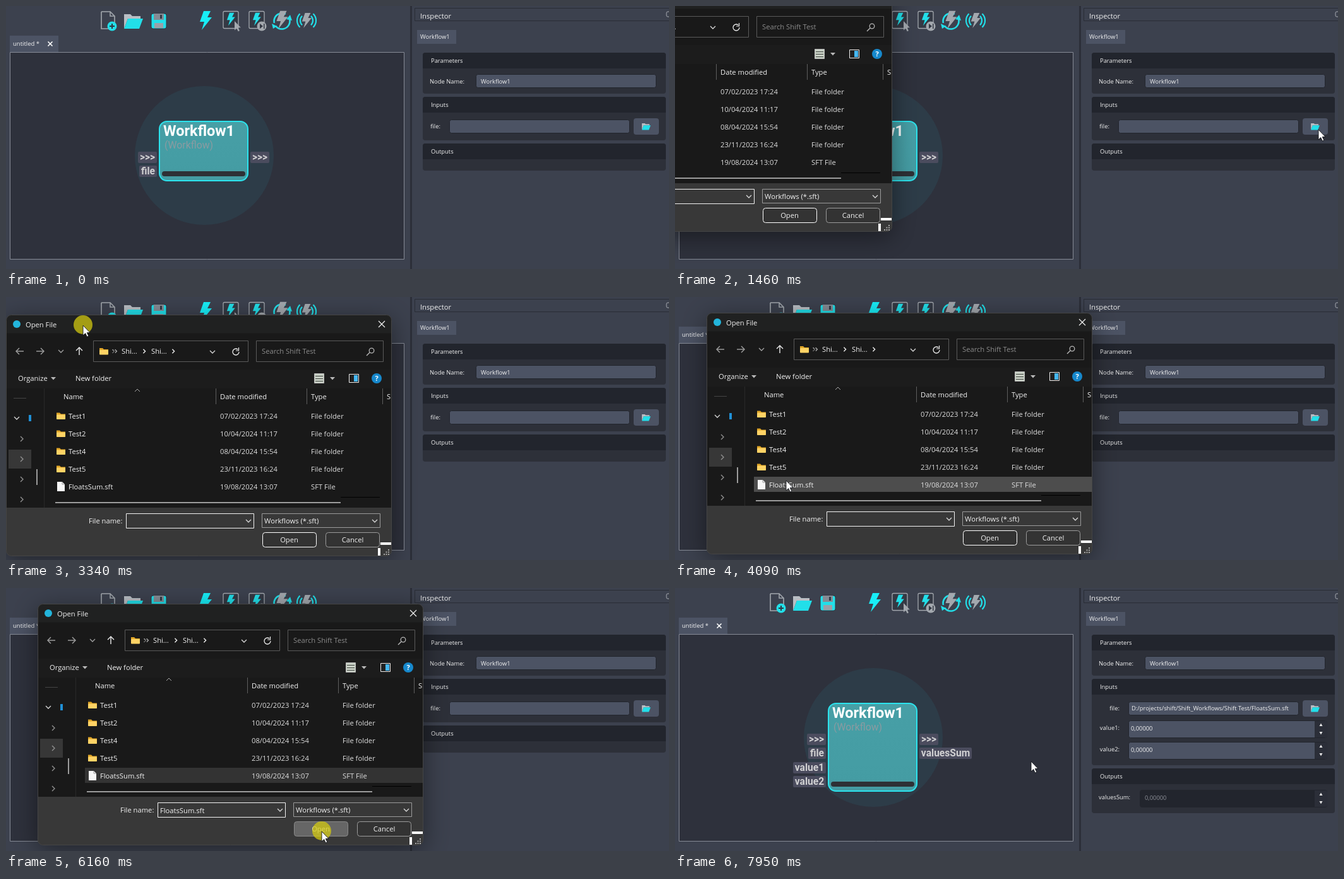
Recreate the animation shown at these times as an HTML page with a canvas. Size 1050 by 417 pixels, loop 8000 ms.

```html
<!DOCTYPE html>
<html lang="en">
<head>
<meta charset="utf-8">
<title>Workflow file picker</title>
<style>
html, body { margin: 0; width: 100%; height: 100%; overflow: hidden; background: #3c414e; }
canvas { display: block; }
</style>
</head>
<body>
<canvas id="stage" width="1050" height="417"></canvas>
<script>
const ctx = document.getElementById('stage').getContext('2d');
const LOOP = 8000, STEP = 65.8;
const CYAN = '#22dfe9', GRAY = '#a3a8ae', FIELD = '#4c5364';
const UI = '"Open Sans", "Noto Sans", sans-serif', NODE = 'Roboto, sans-serif';

// Screen updates arrive in bursts, each with its own clock.
const BURSTS = [0, 450, 1260, 2070, 2270, 3070, 3890, 4500, 5360, 6030, 6490, 7160];
const DIALOG_PATH = [[3000, -267, -53], [3070, -263, -52], [3136, -225, -42], [3202, -125, -16],
  [3268, -50, -3], [3333, 0, 0], [3400, 28, 1], [3540, 50, -3]];
const POINTER_PATH = [[450, 1046, 379], [650, 1040, 310], [900, 1024, 215], [1120, 1019, 196],
  [1590, 1019, 196], [1720, 760, 215], [1850, 300, 232], [1980, 56, 225], [2130, 15, 226],
  [2270, 8, 205], [2400, -14, 97], [2600, -145, -8], [3000, -145, -8]];
const POINTER_PATH_AFTER_DRAG = [[3600, 173, 42], [3800, 171, 64], [3950, 172, 150], [4087, 176, 291],
  [4160, 165, 342], [4340, 131, 299], [4700, 131, 299], [5000, 260, 370], [5290, 450, 418],
  [5360, 520, 414], [5500, 553, 399], [5880, 500, 386], [7160, 500, 386], [7360, 512, 365],
  [7700, 550, 295], [7949, 564, 275]];

function along(path, t) {
  const i = path.findIndex(k => k[0] > t);
  if (i === 0) return path[0].slice(1);
  if (i < 0) return path[path.length - 1].slice(1);
  const [a, b] = [path[i - 1], path[i]], p = (t - a[0]) / (b[0] - a[0]);
  return [1, 2].map(n => Math.round(a[n] + (b[n] - a[n]) * p));
}

function box(x, y, w, h, fill, stroke, r = 0, line = 1) {
  ctx.beginPath();
  ctx.roundRect(x, y, w, h, r);
  if (fill) { ctx.fillStyle = fill; ctx.fill(); }
  if (stroke) { ctx.strokeStyle = stroke; ctx.lineWidth = line; ctx.stroke(); }
}
function disc(x, y, r, fill) {
  ctx.beginPath();
  ctx.arc(x, y, r, 0, 7);
  ctx.fillStyle = fill;
  ctx.fill();
}
function arc(x, y, r, from, to, color, width) {
  ctx.beginPath();
  ctx.arc(x, y, r, from, to);
  ctx.strokeStyle = color;
  ctx.lineWidth = width;
  ctx.stroke();
}
// Points are relative to x, y. Fills a shape, or strokes an open line when width is given.
function poly(x, y, points, color, width, scale = 1) {
  ctx.beginPath();
  for (let i = 0; i < points.length; i += 2) ctx.lineTo(x + points[i] * scale, y + points[i + 1] * scale);
  if (width) { ctx.strokeStyle = color; ctx.lineWidth = width; ctx.stroke(); }
  else { ctx.closePath(); ctx.fillStyle = color; ctx.fill(); }
}
// y is the vertical middle of the capitals.
function text(s, x, y, size, color = '#f2f2f2', family = UI, weight = 400, align = 'left') {
  ctx.font = `${weight} ${size}px ${family}`;
  ctx.textAlign = align;
  ctx.fillStyle = color;
  ctx.fillText(s, x, y + size * 0.36);
}

const bolt = (x, y, scale, color) =>
  poly(x, y, [-3, -15, 8, -15, 3, -5, 10, -5, -6, 15, -2, 2, -9, 2], color, 0, scale);
const pointerShape = (x, y, color, scale = 1) =>
  poly(x, y, [0, 0, 0, 16, 3.7, 12.5, 6.3, 18, 8.8, 17, 6.3, 11.5, 11, 11.5], color, 0, scale);

function openFolder(x, y, scale) {
  poly(x, y, [-15, 12, -15, -11, -5, -11, -2, -8, 11, -8, 11, -4, -9, -4], '#b9bec4', 0, scale);
  poly(x, y, [-9, -4, 15, -4, 9, 12, -15, 12], CYAN, 0, scale);
}

function toolbar() {
  poly(151, 9, [0, 0, 14, 0, 21, 7, 21, 27, 0, 27, 0, 0], GRAY, 1.6);
  poly(165, 9, [0, 0, 0, 7, 7, 7], GRAY, 1.5);
  disc(168, 32, 7.5, CYAN);
  poly(168, 32, [-4, 0, 4, 0], '#303641', 2);
  poly(168, 32, [0, -4, 0, 4], '#303641', 2);
  openFolder(202, 24, 1);
  box(230, 12, 24, 24, CYAN, '#30343f', 3);
  box(234, 12, 16, 10, '#848b94');
  box(244, 14, 3, 6, '#333945');
  box(235, 27, 14, 8, '#9aa1a9');
  bolt(316, 23, 1, '#18eef7');
  for (const x of [344, 385]) {
    box(x, 8.5, 24, 27, '#343944', GRAY, 2, 1.3);
    bolt(x + 12, 21, 0.68, CYAN);
  }
  pointerShape(362, 24, GRAY, 0.9);
  disc(405, 32, 7.5, GRAY);
  poly(405, 32, [-3, -4, 2, 0, -3, 4], '#343944');
  box(408, 28, 1.5, 8, '#343944');
  arc(437, 24, 12.5, -0.2, 2.5, CYAN, 2.6);
  arc(437, 24, 12.5, 2.9, 5.2, CYAN, 2.6);
  poly(449, 19, [-5, 2, 1, -5, 4, 4], CYAN);
  poly(425, 31, [-4, -3, 4, 1, -2, 5], CYAN);
  bolt(437, 22, 0.95, GRAY);
  bolt(476, 23, 0.8, GRAY);
  for (const r of [10, 15]) {
    arc(476, 23, r, -0.8, 0.8, CYAN, 2.2);
    arc(476, 23, r, Math.PI - 0.8, Math.PI + 0.8, CYAN, 2.2);
  }
}

function port(label, x, y, w) {
  box(x, y, w, 18, '#4b4c5e', null, 2);
  text(label, x + w / 2, y + 8.5, 15.6, '#d0d0d2', NODE, 700, 'center');
}

function workspace(expanded) {
  box(6, 47, 77, 26, FIELD);
  text('untitled *', 11, 60, 9.5);
  poly(70, 60, [-3.5, -3.5, 3.5, 3.5], '#fff', 1.6);
  poly(70, 60, [3.5, -3.5, -3.5, 3.5], '#fff', 1.6);
  box(6.5, 73.5, 624, 328, '#2e313c', '#868b96');
  disc(314, 237, 110, '#2d3c48');

  const bottom = expanded ? 322 : 277;
  const fill = ctx.createLinearGradient(0, 183, 0, bottom);
  fill.addColorStop(0, '#479fa6');
  fill.addColorStop(1, '#449ca3');
  box(243, 183, 140, bottom - 183, fill, '#2be4ee', 12, 2);
  text('Workflow1', 249, 198, 23.5, '#fff', NODE, 700);
  text('(Workflow)', 251, 220, 15.8, '#8b9ba1', NODE);
  box(247, bottom - 15, 132, 8, '#2e3035', null, 4);
  port('>>>', 209, 231, 30);
  port('file', 211, 253, 28);
  port('>>>', 387, 231, 30);
  if (expanded) {
    port('value1', 187, 276, 52);
    port('value2', 187, 298, 52);
    port('valuesSum', 387, 253, 83);
  }
}

function panel(title, y, h) {
  box(660, y, 385, h, '#2d3039', null, 4);
  box(660, y, 385, 25, '#22252d', null, [4, 4, 0, 0]);
  text(title, 673, y + 12.5, 9.4);
}
const field = (x, y, w, h = 21, fill = FIELD) => box(x + 0.5, y + 0.5, w - 1, h, fill, '#22252d', 3);

function spinner(label, labelRight, x, y, disabled) {
  text(label, labelRight, y + 12, 9.4, '#f2f2f2', UI, 400, 'right');
  field(x, y, 1033 - x, 27, disabled ? '#22252d' : FIELD);
  box(1013, y + 1, 20, 26, '#2b2e38', null, [0, 3, 3, 0]);
  text('0,00000', x + (disabled ? 8 : 4), y + 13, 9.4, disabled ? '#8c8f97' : '#f2f2f2');
  poly(1023, y + 7, [-2.5, 2, 2.5, 2, 0, -2.5], '#e8e8e8');
  poly(1023, y + 20, [-2.5, -2, 2.5, -2, 0, 2.5], '#e8e8e8');
}

function inspector(loaded) {
  box(640, 0, 3, 417, '#2c2f39');
  box(647.5, 3.5, 420, 20, '#3c414e', '#292c35');
  text('Inspector', 656, 16, 11.2);
  box(1046, 9, 10, 8, null, '#a5a8ae', 2);
  box(651, 38, 62, 22, FIELD);
  text('Workflow1', 656, 49, 9.4);

  panel('Parameters', 74, 65);
  text('Node Name:', 671, 119.5, 9.4);
  field(744, 108, 286);
  text('Workflow1', 752, 119.5, 9.4);

  panel('Inputs', 144, loaded ? 137 : 69);
  text('file:', loaded ? 704 : 688, 190.5, 9.4, '#f2f2f2', UI, 400, 'right');
  const x = loaded ? 718 : 702;
  field(x, 180, 988 - x);
  box(994, 178, 40, 26, FIELD, null, 4);
  openFolder(1014, 191, 0.46);
  if (loaded) {
    text('D:/projects/shift/Shift_Workflows/Shift Test/FloatsSum.sft', 723, 191, 9.4);
    spinner('value1:', 704, 718, 210);
    spinner('value2:', 704, 718, 244);
  }
  panel('Outputs', loaded ? 286 : 218, loaded ? 71 : 43);
  if (loaded) spinner('valuesSum:', 721, 736, 320, true);
}

const chevronDown = (x, y, color = '#d8d8d8') => poly(x, y, [-4, -2, 0, 2, 4, -2], color, 1.3);
const chevronRight = (x, y, color = '#8f8f8f', s = 1) => poly(x, y, [-2, -4, 2, 0, -2, 4], color, 1.4, s);
const triangle = (x, y) => poly(x, y, [-4, -2, 4, -2, 0, 2.5], '#b9b9b9');
function arrow(x, y, angle, color) {
  ctx.save();
  ctx.translate(x, y);
  ctx.rotate(angle);
  poly(0, 0, [-6, 0, 6, 0], color, 1.4);
  poly(0, 0, [1, -5, 6, 0, 1, 5], color, 1.4);
  ctx.restore();
}
function folder(x, y) {
  poly(x, y, [-7, -5, -2, -5, 0, -3, 7, -3, 7, 5, -7, 5], '#e0a526');
  box(x - 7, y - 2, 14, 7.5, '#ffd365', null, 1);
}

const ROWS = [
  ['Test1', '07/02/2023 17:24'], ['Test2', '10/04/2024 11:17'], ['Test4', '08/04/2024 15:54'],
  ['Test5', '23/11/2023 16:24'], ['FloatsSum.sft', '19/08/2024 13:07']
];

function dialog(t, dx, dy, px, py) {
  const label = (s, x, y, color) => text(s, x, y, 11.2, color);
  const over = (x, y, w, h) => px >= x && px < x + w && py >= y && py < y + h;
  ctx.save();
  ctx.translate(dx, dy);
  ctx.shadowColor = 'rgba(0,0,0,.45)';
  ctx.shadowBlur = 40;
  ctx.shadowOffsetY = 8;
  box(0.5, 28.5, 610, 382, '#191919', null, 8);
  ctx.shadowColor = 'transparent';
  box(0.5, 28.5, 610, 29, '#202121', null, [8, 8, 0, 0]);
  box(0.5, 115, 610, 30, '#1c1c1c');
  box(0.5, 334, 610, 76.5, '#383838', null, [0, 0, 8, 8]);
  box(0.5, 28.5, 610, 382, null, '#454545', 8);

  disc(17, 43, 6, '#23b5dc');
  label('Open File', 31, 43.5);
  poly(595, 43, [-5, -5, 5, 5], '#eee', 1.2);
  poly(595, 43, [5, -5, -5, 5], '#eee', 1.2);

  arrow(22, 86, Math.PI, '#a2a2a2');
  arrow(54, 86, 0, '#a2a2a2');
  chevronDown(87, 86, '#a2a2a2');
  arrow(116, 86, -Math.PI / 2, '#eee');
  box(138.5, 69.5, 245, 33, null, '#5a5a5a');
  folder(155, 86);
  chevronRight(170, 86, '#aaa', 0.7);
  chevronRight(174, 86, '#aaa', 0.7);
  ctx.clearRect;
  label('«', 168, 86, '#191919');
  label('Shi...', 183, 86);
  chevronRight(219, 86, '#eee', 0.8);
  const listing = t < 1530;
  label('Shi...', listing ? 244 : 230, 86);
  if (!listing) chevronRight(265, 86, '#eee', 0.8);
  chevronDown(327, 87);
  arc(364, 87, 5, 0, 5.4, '#eee', 1.3);
  poly(368, 82, [0.5, -2, 0.5, 3, -4, 3], '#eee', 1.2);
  box(396.5, 69.5, 201, 33, null, '#5a5a5a');
  label('Search Shift Test', 405, 86, '#8b8b8b');
  arc(579, 85, 3.8, 0, 7, '#b5b5b5', 1.3);
  poly(576, 88, [0, 0, -5, 5], '#b5b5b5', 1.5);

  label('Organize', 19, 129);
  triangle(75, 129);
  label('New folder', 110, 129);
  box(488.5, 121.5, 15, 15, '#c7cfc4', '#bbb');
  for (let y = 125; y < 136; y += 4) box(490, y, 12, 1, '#424742');
  triangle(517, 129);
  box(543.5, 122.5, 15, 13, '#202020', '#eee');
  box(551, 124, 6, 10, '#45b8f4');
  disc(587, 129, 8, '#1688cc');
  text('?', 587, 129, 11, '#fff', UI, 700, 'center');

  label('Name', 91, 158);
  label('Date modified', 339, 158);
  label('Type', 483, 158);
  label('S', 603, 158);
  poly(208, 148, [-4, 2, 0, -2, 4, 2], '#aaa', 1);
  for (const x of [332, 476, 596]) box(x, 145, 1, 25, '#5e5e5e');

  box(12, 160, 20, 1, '#444');
  chevronDown(17, 192);
  box(36, 187, 4, 10, '#2090d6');
  box(4, 242, 36, 30, '#373737');
  for (const y of [225, 257, 289, 321]) chevronRight(25, y);
  box(60, 145, 1, 189, '#292929');
  box(48, 273, 2, 25, '#9c9c9c');

  ROWS.forEach(([name, date], i) => {
    const y = 189 + 28 * i, isFile = i === 4;
    const hovered = over(75, y - 13, 535, 24);
    const shade = isFile && t >= 6030 ? '#333' : isFile && t >= 4566 ? '#777' : hovered ? '#4d4d4d' : null;
    if (shade) box(75, y - 13, 535, 24, shade);
    if (isFile) {
      poly(87, y, [-6, -8, 2, -8, 6, -4, 6, 7, -6, 7], '#f5f5f5');
      poly(87, y, [2, -8, 2, -4, 6, -4], '#999', 1);
    } else folder(87, y - 0.5);
    label(name, 99, y);
    label(date, 339, y, '#dedede');
    label(isFile ? 'SFT File' : 'File folder', 483, y, '#dedede');
  });
  box(78, 325, 452, 2, '#9c9c9c');
  box(530, 317, 62, 1, '#000');

  label('File name:', 131, 355);
  box(190.5, 343.5, 202, 23, '#383838', '#f2f2f2');
  if (t >= 4566) label('FloatsSum.sft', 194, 355.5);
  chevronDown(384, 355);
  box(405.5, 343.5, 187, 22, '#383838', '#9b9b9b');
  label('Workflows (*.sft)', 409, 355);
  chevronDown(584, 355);
  const openFill = t >= 6030 ? '#666' : over(406, 373, 86, 23) ? '#454545' : '#333';
  box(406.5, 373.5, 85, 23, openFill, t >= 6030 ? '#8a8a8a' : '#fff', 4);
  box(506.5, 373.5, 85, 23, '#333', '#9b9b9b', 4);
  text('Open', 448.5, 385, 11.2, '#f2f2f2', UI, 400, 'center');
  text('Cancel', 549, 385, 11.2, '#f2f2f2', UI, 400, 'center');

  box(593, 389, 17, 4, '#fff');
  box(589, 398, 4, 12, '#fff');
  for (let i = 0; i < 3; i++)
    for (let j = 0; j <= i; j++) box(605 - 3.5 * j, 400 + 3.5 * i, 2, 2, '#a8a8a8');
  ctx.restore();
}

function draw(now) {
  const t = now % LOOP;
  const start = BURSTS.findLast(b => b <= t);
  const tick = start + Math.floor((t - start) / STEP) * STEP;
  const [dx, dy] = along(DIALOG_PATH, tick);
  const [px, py] = t < 3000 ? along(POINTER_PATH, tick)
    : t < 3600 ? [dx + 122, dy + 45] : along(POINTER_PATH_AFTER_DRAG, tick);

  box(0, 0, 1050, 417, '#3c414e');
  toolbar();
  workspace(t >= 7160);
  inspector(t >= 6560);
  if (t >= 1390 && t < 6490) dialog(t, dx, dy, px - dx, py - dy);

  if (t >= 450) {
    const pressed = [[1260, 1390], [2950, 3600], [4500, 4640], [6030, 6490]].some(([a, b]) => t >= a && t < b);
    if (pressed) disc(px, py - 1, 15, 'rgba(215,205,15,.72)');
    ctx.save();
    ctx.lineJoin = 'round';
    pointerShape(px, py, '#fff');
    ctx.strokeStyle = '#15171c';
    ctx.lineWidth = 0.9;
    ctx.closePath();
    ctx.stroke();
    ctx.restore();
  }
  requestAnimationFrame(() => draw(performance.now()));
}
draw(performance.now());
</script>
</body>
</html>
```
